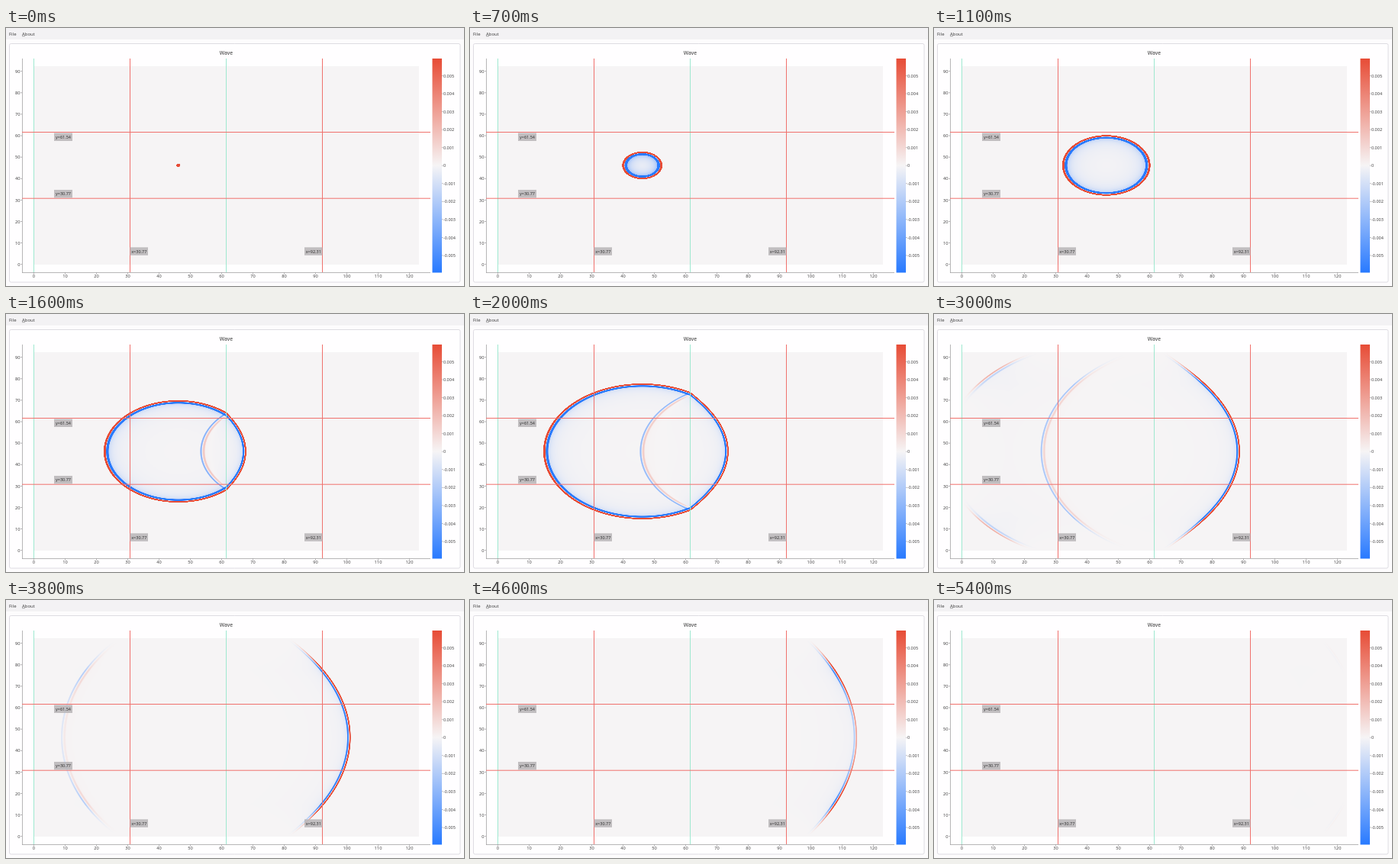
An HTML page with a canvas for the animation above (5.6 s loop, 600x338 px).

```html
<!DOCTYPE html>
<html lang="en">
<head>
<meta charset="utf-8">
<title>Wave</title>
<style>
html, body { margin: 0; width: 100%; height: 100%; overflow: hidden; background: #fdfcfd; }
canvas { display: block; }
</style>
</head>
<body>
<canvas id="stage" width="600" height="338"></canvas>
<script>
const ctx = document.getElementById('stage').getContext('2d');
const LOOP = 5600, STEP = 100;
const RED = [231, 76, 54], MID = [246, 244, 245], BLUE = [41, 122, 255];
const css = c => `rgb(${c})`;

// Data units to pixels
const X0 = 36.5, Y0 = 309.7, SX = 4.1, SY = 2.811;
const px = x => X0 + x * SX, py = y => Y0 - y * SY;

// Two media meeting at x = EDGE; the right one is slower
const W = 123.08, H = 92.31, EDGE = 61.54, MIDDLE = 46.15, SLOW = 0.75, SPONGE = 15;
const LEFT = 36, TOP = 50, COLS = 505, ROWS = 260;
const field = ctx.createImageData(COLS, ROWS);
const size = COLS * ROWS;
const arrival = new Float32Array(size), echo = new Float32Array(size), gain = new Float32Array(size);

// Length of the fastest refracted path to a point behind the interface
function refracted(dx, h) {
  const a = EDGE - MIDDLE;
  let lo = 0, hi = h;
  for (let i = 0; i < 18; i++) {
    const s = (lo + hi) / 2, rest = h - s;
    if (s / Math.hypot(a, s) < rest / (SLOW * Math.hypot(dx, rest))) lo = s;
    else hi = s;
  }
  return Math.hypot(a, lo) + Math.hypot(dx, h - lo) / SLOW;
}

const absorb = d => Math.min(1, Math.max(0, d) / SPONGE) ** 2.1;

for (let j = 0, i = 0; j < ROWS; j++) {
  const y = (Y0 - TOP - j - 0.5) / SY, h = Math.abs(y - MIDDLE);
  const edgeY = absorb(Math.min(y, H - y));
  for (let c = 0; c < COLS; c++, i++) {
    const x = (LEFT + c + 0.5 - X0) / SX, right = x > EDGE;
    arrival[i] = right ? refracted(x - EDGE, h) : Math.hypot(x - MIDDLE, h);
    echo[i] = right ? Infinity : Math.hypot(2 * EDGE - MIDDLE - x, h);
    gain[i] = edgeY * absorb(Math.min(x, W - x)) * (right ? 6 / 7 : 1);
  }
}

// Crest, trough and fading wake, u behind the front
function pulse(u) {
  if (u <= 0) return 0;
  if (u < 0.75) return 5 * Math.sin(Math.PI * u / 0.75);
  const wake = -0.6 * u ** -1.4;
  return u < 1.75 ? Math.min(wake * (u - 0.75), -2.6 * Math.sin(Math.PI * (u - 0.75))) : wake;
}

// Time in ms and radius of the front
const FRONT = [[400, 0.7], [1100, 14.15], [2000, 31.7], [3000, 51.9], [3800, 68.4], [4600, 86.5], [5600, 109]];
function frontAt(t) {
  if (t <= FRONT[0][0]) return FRONT[0][1];
  const k = FRONT.findIndex(p => p[0] >= t);
  const [t0, r0] = FRONT[k - 1], [t1, r1] = FRONT[k];
  return r0 + (r1 - r0) * (t - t0) / (t1 - t0);
}

function drawField(r) {
  const amp = Math.sqrt(14 / r), data = field.data;
  for (let i = 0; i < size; i++) {
    const v = amp * gain[i] * (pulse(r - arrival[i]) - pulse(r - echo[i]) / 7);
    const end = v > 0 ? RED : BLUE, m = Math.min(1, Math.abs(v));
    for (let k = 0; k < 3; k++) data[i * 4 + k] = MID[k] + (end[k] - MID[k]) * m;
    data[i * 4 + 3] = 255;
  }
  ctx.putImageData(field, LEFT, TOP);
}

function box(x, y, w, h, color) {
  ctx.fillStyle = color;
  ctx.fillRect(x, y, w, h);
}

function text(str, x, y, font = 5.6, align = 'center', color = '#444') {
  ctx.font = `${font}px "Noto Sans", "Open Sans", sans-serif`;
  ctx.textAlign = align;
  ctx.fillStyle = color;
  ctx.fillText(str, x, y);
}

function tag(str, x, y, w) {
  box(x, y, w, 10.5, 'rgba(184,182,184,0.85)');
  text(str, x + w / 2, y + 7.4, 5.5, 'center', '#333');
}

function drawWindow() {
  box(0, 0, 600, 338, '#fdfcfd');
  box(0, 0, 600, 15, '#f3f2f4');
  text('File', 4, 9.8, 6, 'left');
  text('About', 21, 9.8, 5.9, 'left');
  box(21, 10.6, 4, 0.5, '#555');
  ctx.strokeStyle = '#dedce2';
  ctx.lineWidth = 1;
  ctx.beginPath();
  ctx.roundRect(4.5, 20.5, 590.5, 312.5, 2);
  ctx.fillStyle = '#fffeff';
  ctx.fill();
  ctx.stroke();
  text('Wave', 288.5, 35.2, 6.8, 'center', '#333');
}

function drawAxes() {
  const axis = '#a5a4a6';
  box(21, 40, 0.8, 281, axis);
  box(21, 320, 535, 0.8, axis);
  for (let v = 0; v <= 120; v += 10) {
    box(px(v) - 0.4, 320, 0.8, 2.5, axis);
    text(v, px(v), 327.3, 5.7);
    if (v > 90) continue;
    box(19, py(v) - 0.4, 2, 0.8, axis);
    text(v, 18.6, py(v) + 2.2, 5.7, 'right');
  }
}

function drawLines() {
  const red = '#f0716d', green = '#9fe8d0';
  for (const k of [0, 1, 2, 3]) box(Math.floor(px(k * EDGE / 2)), 40, 1, 280, k % 2 ? red : green);
  for (const y of [136, 222.7]) box(21, y, 535, 1, red);
  tag('y=61.54', 63, 137.5, 24);
  tag('y=30.77', 63, 212, 24);
  tag('x=30.77', 162.5, 287.3, 23.5);
  tag('x=92.31', 391, 287.3, 23.5);
}

function drawScale() {
  const g = ctx.createLinearGradient(0, 40, 0, 320);
  [RED, MID, BLUE].forEach((c, i) => g.addColorStop(i / 2, css(c)));
  box(558.5, 40, 12.5, 280.5, g);
  for (let k = -5; k <= 5; k++) {
    const y = 180.2 - k * 23.55;
    box(571, y - 0.4, 1.5, 0.8, '#a5a4a6');
    text(k ? (k / 1000).toFixed(3) : '0', 573, y + 2.1, 5.5, 'left');
  }
}

let shown = -1;
function tick() {
  const t = Math.floor(performance.now() % LOOP / STEP) * STEP;
  if (t !== shown) {
    shown = t;
    drawWindow();
    drawField(frontAt(Math.min(t, 5400)));
    drawAxes();
    drawLines();
    drawScale();
  }
  requestAnimationFrame(tick);
}
tick();
</script>
</body>
</html>
```
